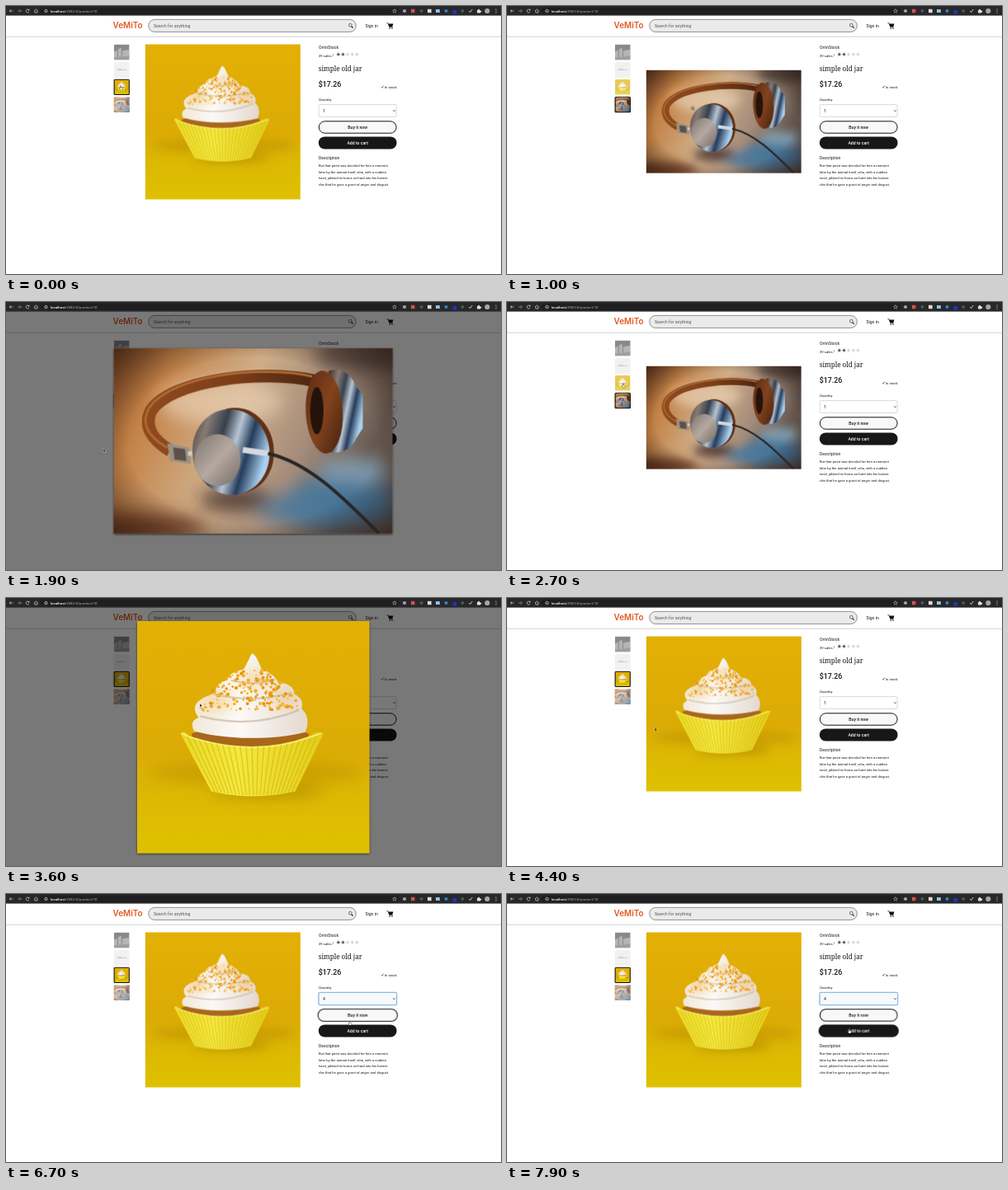
An HTML page for the animation above (8000 ms loop, 600 by 325 pixels).

```html
<!DOCTYPE html>
<html lang="en">
<head>
<meta charset="utf-8">
<title>Product page</title>
<style>
html, body { margin: 0; width: 100%; height: 100%; overflow: hidden; background: #fff; }
svg.stage { display: block; width: 600px; height: 325px; }
text { font-family: Roboto, Arial, sans-serif; font-size: 5.15px; fill: #151515; }
.small { font-size: 4.2px; }
.strong { font-weight: 500; }
.mid { text-anchor: middle; }
.white { fill: #fff; }

/* One loop is 8 s, so 1.25% is 100 ms */
.step { animation: 8s step-end infinite; }
.cup { animation-name: cup; }
.phones { animation-name: phones; }
#zoomPhones { animation-name: zoomPhones; }
#zoomCup { animation-name: zoomCup; }
#menu { animation-name: menu; }
#bar { animation-name: bar; }
#one { animation-name: one; }
#four { animation-name: four; }
#focus { animation-name: focus; }
#buy { animation-name: buy; transform-origin: 426.2px 147px; }
#add { animation-name: add; transform-origin: 426.2px 166px; }
#arrow { animation-name: arrow; }
#hand { animation-name: hand; }
#lens { animation-name: lens; }
#pointer { animation: move 8s ease-in-out infinite; }

@keyframes cup { 0%, 36.25%, 100% { opacity: 1 } 5% { opacity: 0 } }
@keyframes phones { 0%, 36.25%, 100% { opacity: 0 } 5% { opacity: 1 } }
@keyframes zoomPhones { 0%, 26.25%, 100% { opacity: 0 } 17.5% { opacity: 1 } }
@keyframes zoomCup { 0%, 52.5%, 100% { opacity: 0 } 42.5% { opacity: 1 } }
@keyframes menu { 0%, 73.75%, 100% { opacity: 0 } 63.75% { opacity: 1 } }
@keyframes bar {
  0% { transform: none }
  66.25% { transform: translateY(8.1px) }
  67.5%, 100% { transform: translateY(16.2px) }
  70% { transform: translateY(24.3px) }
}
@keyframes one { 0% { opacity: 1 } 73.75%, 100% { opacity: 0 } }
@keyframes four { 0% { opacity: 0 } 73.75%, 100% { opacity: 1 } }
@keyframes focus { 0% { opacity: 0 } 63.75%, 100% { opacity: 1 } }
@keyframes buy { 0%, 85%, 100% { transform: none } 73.75% { transform: scale(1.027) } }
@keyframes add { 0% { transform: none } 85%, 100% { transform: scale(1.027) } }
@keyframes hand { 0%, 30%, 73.75%, 100% { opacity: 1 } 7.5%, 37.5% { opacity: 0 } }
@keyframes lens { 0%, 17.5%, 42.5%, 100% { opacity: 0 } 7.5%, 37.5% { opacity: 1 } }
@keyframes arrow { 0%, 30%, 73.75%, 100% { opacity: 0 } 17.5%, 42.5% { opacity: 1 } }
@keyframes move {
  0% { transform: translate(139px, 97px) }
  3.75%, 5% { transform: translate(140px, 119px) }
  12.5%, 17.5% { transform: translate(225px, 124px) }
  23.75%, 26.25% { transform: translate(118px, 178px) }
  33.75%, 36.25% { transform: translate(141px, 99px) }
  41.25%, 45% { transform: translate(235px, 128px) }
  50%, 52.5% { transform: translate(143px, 162px) }
  62.5%, 64% { transform: translate(420px, 126px) }
  68.75% { transform: translate(416.5px, 149px) }
  71.25%, 82.5% { transform: translate(417px, 151px) }
  86.25%, 100% { transform: translate(415px, 164px) }
}
</style>
</head>
<body>
<svg class="stage" viewBox="0 0 600 325">
  <defs>
    <linearGradient id="wall" x2="0" y2="1">
      <stop stop-color="#e3b005"/><stop offset=".55" stop-color="#dcab05"/>
      <stop offset=".75" stop-color="#dcb803"/><stop offset="1" stop-color="#dfc100"/>
    </linearGradient>
    <linearGradient id="paper">
      <stop stop-color="#eada25"/><stop offset=".4" stop-color="#f5e83f"/><stop offset="1" stop-color="#e2cc18"/>
    </linearGradient>
    <linearGradient id="cream">
      <stop stop-color="#f1e7d8"/><stop offset=".4" stop-color="#fcfaf7"/><stop offset="1" stop-color="#e4d9d0"/>
    </linearGradient>
    <linearGradient id="table" x2="1" y2=".3">
      <stop stop-color="#8c522a"/><stop offset=".2" stop-color="#c48348"/><stop offset=".5" stop-color="#cfad88"/>
      <stop offset=".78" stop-color="#a38b7a"/><stop offset="1" stop-color="#665850"/>
    </linearGradient>
    <linearGradient id="metal" x2="1" y2=".5">
      <stop stop-color="#3d2d25"/><stop offset=".25" stop-color="#857c77"/><stop offset=".45" stop-color="#38404c"/>
      <stop offset=".62" stop-color="#b7c5d4"/><stop offset=".78" stop-color="#263c5b"/><stop offset="1" stop-color="#a9d0ee"/>
    </linearGradient>
    <linearGradient id="disc" x2="1" y2="1">
      <stop stop-color="#80766f"/><stop offset=".5" stop-color="#b5a9a1"/><stop offset="1" stop-color="#756b66"/>
    </linearGradient>
    <linearGradient id="leather" x2="1" y2="1">
      <stop stop-color="#5a2c12"/><stop offset=".5" stop-color="#83431d"/><stop offset="1" stop-color="#42200f"/>
    </linearGradient>
    <linearGradient id="strap">
      <stop stop-color="#8f4a1f"/><stop offset=".5" stop-color="#7d3f19"/><stop offset="1" stop-color="#4c2612"/>
    </linearGradient>
    <radialGradient id="edge" cx=".5" cy=".5" r=".75">
      <stop offset=".6" stop-color="#20100a" stop-opacity="0"/><stop offset="1" stop-color="#20100a" stop-opacity=".75"/>
    </radialGradient>
    <linearGradient id="menuFill" x2="0" y2="1">
      <stop stop-color="#4b4b4d"/><stop offset="1" stop-color="#58595c"/>
    </linearGradient>
    <filter id="soft" x="-50%" y="-100%" width="200%" height="300%"><feGaussianBlur stdDeviation="6"/></filter>
    <filter id="shade" x="-5%" y="-5%" width="110%" height="110%">
      <feDropShadow dx="0" dy="1" stdDeviation="1.5" flood-opacity=".6"/>
    </filter>
    <clipPath id="square"><rect width="18.8" height="18.8" rx="1"/></clipPath>
    <path id="star" d="M0-2.5.7-.8 2.5-.7 1.1.4 1.5 2.2 0 1.2-1.5 2.2-1.1.4-2.5-.7-.7-.8Z"/>

    <symbol id="cake" viewBox="0 0 188 188">
      <rect width="188" height="188" fill="url(#wall)"/>
      <g filter="url(#soft)">
        <ellipse cx="96" cy="123" rx="88" ry="9" fill="#b88c00" opacity=".5"/>
        <ellipse cx="105" cy="138" rx="46" ry="4" fill="#9a7200" opacity=".65"/>
      </g>
      <path d="M44 91Q94 78 139 91L136 108H48Z" fill="#a8671b"/>
      <path d="M35 91Q38 88 42 93 94 110 140 93 146 88 151 91L128 138Q94 146 60 138Z" fill="url(#paper)"/>
      <path d="M36 91 43 94Q94 111 140 94L149 91" fill="none" stroke="#f8f07c"/>
      <g id="pleats" fill="none" stroke="#c9aa08" stroke-width=".9" opacity=".5"/>
      <path d="M93 26C97 28 98 33 101 39 109 42 114 47 114 50 123 50 128 55 127 59 133 62 135 66 133 71 139 76 139 84 136 90 108 97 70 96 46 89 43 83 45 80 50 78 45 73 46 67 51 64 55 61 59 60 64 58 62 53 68 49 73 48 74 42 80 41 86 39 88 37 90 31 93 26Z" fill="url(#cream)"/>
      <g fill="#f0a928" filter="url(#soft)" opacity=".45">
        <ellipse cx="65" cy="64" rx="13" ry="6"/><ellipse cx="119" cy="62" rx="10" ry="5"/><ellipse cx="93" cy="46" rx="12" ry="5"/>
      </g>
      <g fill="none" stroke="#c4b09a" stroke-width="1.6" opacity=".6">
        <path d="M76 48Q95 53 112 47M62 59Q92 67 125 58M51 77Q92 88 131 72"/>
      </g>
      <g id="crumbs"/>
    </symbol>

    <symbol id="set" viewBox="0 0 188 125">
      <rect width="188" height="125" fill="url(#table)"/>
      <g filter="url(#soft)">
        <ellipse cx="72" cy="36" rx="42" ry="15" fill="#e6cdb0" opacity=".75"/>
        <ellipse cx="20" cy="121" rx="42" ry="10" fill="#6b3617" opacity=".8"/>
        <ellipse cx="162" cy="83" rx="24" ry="9" fill="#86abc2" opacity=".8"/>
        <path d="M95 112 135 86 188 93V117L140 122Z" fill="#3e7aa5" opacity=".8"/>
        <ellipse cx="82" cy="102" rx="25" ry="7" fill="#35231f" opacity=".8"/>
        <ellipse cx="170" cy="4" rx="35" ry="11" fill="#423733" opacity=".7"/>
      </g>
      <rect width="188" height="125" fill="url(#edge)"/>
      <path d="M38 69Q18 57 25 42C39 21 100 14 136 22" fill="none" stroke="url(#strap)" stroke-width="8.5"/>
      <path d="M36 67Q15 55 24 40C39 18 100 11 134 19" fill="none" stroke="#b06a30" stroke-width="1.5"/>
      <path d="M145 15Q158 12 163 25L168 31V54L164 60Q159 72 145 70Z" fill="url(#metal)"/>
      <ellipse cx="142" cy="43" rx="12.5" ry="28" transform="rotate(-3 142 43)" fill="url(#leather)"/>
      <ellipse cx="137" cy="42" rx="4.5" ry="16" fill="#25120b"/>
      <path d="M36 64 51 67 52 78 38 76Z" fill="#9c9084"/>
      <path d="M40 67 48 68 49 76 41 75Z" fill="#5c5148"/>
      <path d="M50 71H57" stroke="#ccc" stroke-width="3"/>
      <ellipse cx="83" cy="69" rx="25" ry="29" transform="rotate(-8 83 69)" fill="#613015"/>
      <ellipse cx="79" cy="70" rx="26" ry="29" transform="rotate(-8 79 70)" fill="url(#metal)"/>
      <ellipse cx="70" cy="75.5" rx="15.5" ry="17.5" fill="url(#disc)"/>
      <path d="M87 69 104 71C132 77 156 102 179 125" fill="none" stroke="#292525" stroke-width="2.2"/>
      <path d="M87 68.5 104 71" stroke="#d4d8de" stroke-width="4"/>
    </symbol>
  </defs>

  <rect width="600" height="325" fill="#fff"/>

  <!-- Shop header -->
  <text x="129.6" y="26.6" style="font: 600 9.9px Inter, sans-serif; fill: #e0561f">VeMiTo</text>
  <rect x="172.7" y="16.4" width="251.6" height="15" rx="7.5" fill="#ebebeb" stroke="#777" stroke-width=".8"/>
  <text x="179" y="25.9" style="fill: #555">Search for anything</text>
  <g fill="none" stroke="#222"><circle cx="417.3" cy="23.2" r="1.9" stroke-width=".6"/><path d="M418.7 24.6 420.6 26.7" stroke-width="1.2"/></g>
  <text x="435.4" y="25.9">Sign in</text>
  <path d="M461.4 20.7H463L464.8 25.6H468.6" fill="none" stroke="#111" stroke-width=".7"/>
  <path d="M463.2 21.4H469.4L468.4 24.9H464.4Z" fill="#111"/>
  <circle cx="465.2" cy="27" r=".8"/><circle cx="468" cy="27" r=".8"/>
  <path d="M0 37.2H600" stroke="#c8c8c8" stroke-width=".8"/>

  <!-- Thumbnails -->
  <g transform="translate(130.8 46.6)" opacity=".8" clip-path="url(#square)">
    <rect width="18.8" height="18.8" fill="#6c6c6c"/>
    <path d="M0 9 4 7V16H0ZM5 6 9 4V16H5ZM10 8 18.8 6V16H10Z" fill="#a3a3a3"/>
    <path d="M0 18.8V16L18.8 14V18.8Z" fill="#888"/>
  </g>
  <g transform="translate(130.8 67.9)">
    <rect width="18.8" height="18.8" rx="1" fill="#f1f1f1"/>
    <path d="M4 9.5H15M5 8V10M8 7.5V10" stroke="#b8b8b8" stroke-width=".7"/>
  </g>
  <g transform="translate(130.8 89)">
    <g clip-path="url(#square)"><use href="#cake" width="18.8" height="18.8"/></g>
    <rect class="step phones" width="18.8" height="18.8" fill="#fff" fill-opacity=".33"/>
    <rect class="step cup" x=".3" y=".3" width="18.2" height="18.2" rx="1" fill="none" stroke="#111" stroke-width="1.1"/>
  </g>
  <g transform="translate(130.8 110.2)">
    <g clip-path="url(#square)"><use href="#set" x="-4.7" width="28.2" height="18.8"/></g>
    <rect class="step cup" width="18.8" height="18.8" fill="#fff" fill-opacity=".33"/>
    <rect class="step phones" x=".3" y=".3" width="18.2" height="18.2" rx="1" fill="none" stroke="#111" stroke-width="1.1"/>
  </g>

  <!-- Main picture -->
  <use class="step cup" href="#cake" x="168.8" y="46.5" width="188" height="188"/>
  <use class="step phones" href="#set" x="168.8" y="77.8" width="188" height="125"/>

  <!-- Details -->
  <text x="379" y="52.3">OrrinStock</text>
  <text x="379" y="61.6" class="small">39 sales</text>
  <text x="396.3" y="61.4" class="small">|</text>
  <g fill="#555"><use href="#star" x="402.8" y="58.6"/><use href="#star" x="408.5" y="58.6"/></g>
  <g fill="#d2d2d2"><use href="#star" x="414.1" y="58.6"/><use href="#star" x="419.8" y="58.6"/><use href="#star" x="425.4" y="58.6"/></g>
  <text x="378.8" y="79.3" style="font: 8.1px 'Noto Serif', serif">simple old jar</text>
  <text x="378.8" y="98.4" class="strong" style="font-size: 8.8px">$17.26</text>
  <path d="M454.9 98.2 456 99.4 457.7 96.6" fill="none" stroke="#111" stroke-width=".6"/>
  <text x="473.6" y="99.5" class="small" text-anchor="end">In stock</text>
  <text x="379" y="115.4" class="small">Quantity</text>
  <rect x="379.2" y="119.6" width="94" height="14.8" rx="1.2" fill="#fff" stroke="#c9c9c9" stroke-width=".7"/>
  <rect id="focus" class="step" x="379" y="119.4" width="94.6" height="15.2" rx="1.4" fill="#f7f9fc" stroke="#8dbbe6" stroke-width="1.3"/>
  <text id="one" class="step" x="384" y="129">1</text>
  <text id="four" class="step" x="384" y="129">4</text>
  <path d="M469.2 126.4 470.5 127.8 471.8 126.4" fill="none" stroke="#222" stroke-width=".8"/>
  <g id="buy" class="step">
    <rect x="379.3" y="139.8" width="93.8" height="14.4" rx="7.2" fill="#f8f8f8" stroke="#151515"/>
    <text x="426.2" y="148.9" class="mid strong">Buy it now</text>
  </g>
  <g id="add" class="step">
    <rect x="378.8" y="158.4" width="94.8" height="15" rx="7.5" fill="#171717"/>
    <text x="426.2" y="167.8" class="mid strong white">Add to cart</text>
  </g>
  <text x="379" y="186.2" style="font-size: 5px">Description</text>
  <text x="379" y="195.1" class="small">But that point was decided for him a moment</text>
  <text x="379" y="202.6" class="small">later by the animal itself, who, with a sudden</text>
  <text x="379" y="210.1" class="small">twist, jabbed its horns so hard into his lowest</text>
  <text x="379" y="217.6" class="small">ribs that he gave a grunt of anger and disgust.</text>

  <!-- Quantity menu -->
  <g id="menu" class="step">
    <rect x="376" y="122" width="95" height="44" rx="2" fill="url(#menuFill)" stroke="#38383a" stroke-width=".5" filter="url(#shade)"/>
    <rect id="bar" class="step" x="376" y="123.7" width="95" height="8.1" fill="#3c82e6"/>
    <path d="M379.4 128 380.6 129.4 382.4 126" fill="none" stroke="#fff" stroke-width=".7"/>
    <g id="options"></g>
  </g>

  <!-- Enlarged pictures -->
  <g id="zoomPhones" class="step">
    <rect y="11" width="600" height="314" fill-opacity=".53"/>
    <rect x="130.8" y="56" width="337.5" height="225" fill="#8a5a34" filter="url(#shade)"/>
    <use href="#set" x="130.8" y="56" width="337.5" height="225"/>
  </g>
  <g id="zoomCup" class="step">
    <rect y="11" width="600" height="314" fill-opacity=".53"/>
    <rect x="159" y="28" width="281.4" height="281.4" fill="#dcae04" filter="url(#shade)"/>
    <use href="#cake" x="159" y="28" width="281.4" height="281.4"/>
  </g>

  <!-- Browser bar -->
  <rect width="600" height="11.6" fill="#28282b"/>
  <rect x="41" y="1.6" width="436" height="8.4" rx="4.2" fill="#1f1f22"/>
  <g fill="none" stroke="#d5d5d5" stroke-width=".7">
    <path d="M8.5 6H4.2M6 4.2 4.2 6 6 7.8"/>
    <path d="M14 6H18.3M16.5 4.2 18.3 6 16.5 7.8" stroke="#999"/>
    <path d="M28 5A2 2 0 1 0 28 7M28.2 3.8V5.2H26.8"/>
    <path d="M34 6 36.3 3.9 38.6 6M34.8 5.5V8H37.8V5.5"/>
    <circle cx="48.5" cy="6" r="1.8"/><path d="M48.5 5.8V7"/>
  </g>
  <text x="54" y="7.6" style="font-size: 4.35px; fill: #b0b0b0"><tspan class="white strong">localhost</tspan>:3003/#/product/10</text>
  <use href="#star" x="471" y="6" fill="none" stroke="#ccc" stroke-width=".5"/>
  <g>
    <circle cx="483" cy="6" r="2.1" fill="#a5a5a5"/>
    <rect x="491" y="3.8" width="4.4" height="4.4" fill="#d9524b"/>
    <circle cx="503.5" cy="6" r="2" fill="#555"/>
    <rect x="511" y="3.8" width="4.6" height="4.4" fill="#e9dada"/>
    <rect x="521" y="4" width="4.8" height="4" fill="#8fc2e9"/>
    <circle cx="533.5" cy="6" r="2" fill="#3386c4"/>
    <rect x="541.5" y="5" width="4.6" height="4.6" fill="#2434b4"/>
    <circle cx="553.3" cy="6" r="1.9" fill="#555"/>
    <path d="M561 6 562.6 7.6 565.2 4" fill="none" stroke="#ddd" stroke-width=".9"/>
    <path d="M571 5H572.3A.9.9 0 1 1 573.9 5H575.1V6.1A.8.8 0 1 1 575.1 7.3V8.5H571Z" fill="#ddd"/>
    <circle cx="583.3" cy="6" r="3.1" fill="#aaa3a0"/>
    <g fill="#ddd"><circle cx="594" cy="4" r=".6"/><circle cx="594" cy="6" r=".6"/><circle cx="594" cy="8" r=".6"/></g>
  </g>

  <!-- Pointer -->
  <g id="pointer" stroke="#fff" stroke-width=".4">
    <path id="arrow" class="step" d="M0 0V4L1 3.2 1.7 4.7 2.4 4.4 1.8 2.9H3Z"/>
    <path id="hand" class="step" d="M-.5 0Q0-.5.5 0V1.7L2.2 2.2V3.8L1.6 5H-.8L-1.8 3 -1.3 2.5 -.5 3.1Z" fill="#fff" stroke="#111"/>
    <g id="lens" class="step" stroke="#111" stroke-width=".5">
      <circle r="1.8" fill="#fff"/><path d="M-1 0H1M0-1V1M1.3 1.3 2.8 2.8"/>
    </g>
  </g>
</svg>
<script>
const draw = (id, tag, attrs) => {
  const node = document.createElementNS('http://www.w3.org/2000/svg', tag);
  for (const key in attrs) node.setAttribute(key, attrs[key]);
  return document.getElementById(id).appendChild(node);
};

for (let n = 1; n <= 5; n++) {
  draw('options', 'text', { x: 384, y: 121.5 + n * 8.1, class: 'white' }).textContent = n;
}

// Folds of the paper case
for (let i = 1; i < 24; i++) {
  const u = i / 24, sag = 4 * u * (1 - u);
  draw('pleats', 'path', { d: `M${36 + 114 * u} ${92 + 10 * sag}L${60 + 68 * u} ${138 + 3 * sag}` });
}

let seed = 7;
const random = () => (seed = seed * 16807 % 2147483647) / 2147483647;
for (let i = 0; i < 190; i++) {
  const y = 40 + 33 * random();
  const x = 92 + (random() * 2 - 1) * Math.min(41, (y - 28) * 1.1);
  draw('crumbs', 'circle', { cx: x, cy: y, r: .5 + random(), fill: i % 3 ? '#f3b02c' : '#e8940f' });
}
</script>
</body>
</html>
```
